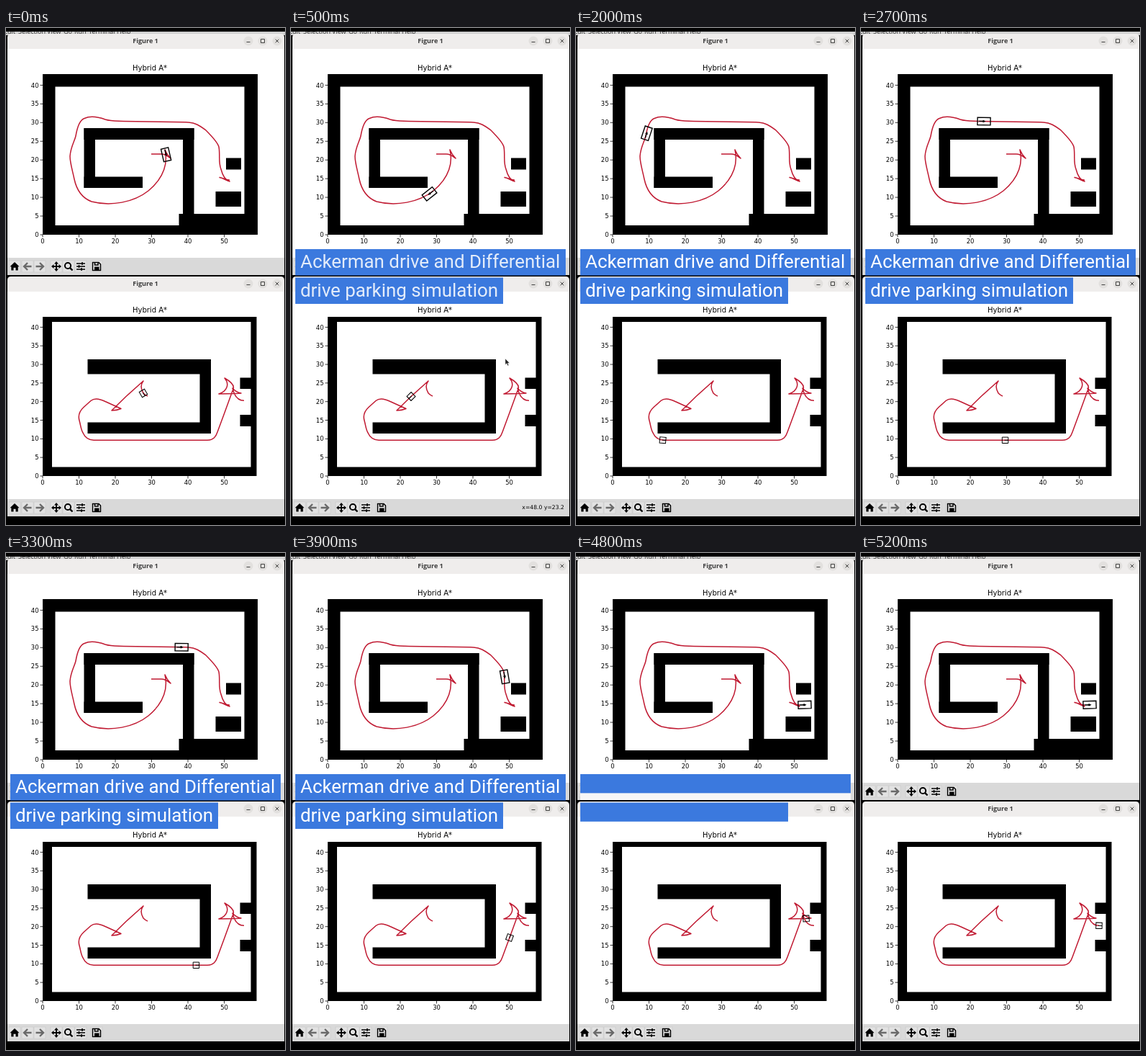
An HTML page for the animation above (5300 ms loop, 388 by 690 pixels).

```html
<!DOCTYPE html>
<html lang="en">
<head>
<meta charset="utf-8">
<title>Parking simulation</title>
<style>
  html, body { margin: 0; width: 100%; height: 100%; overflow: hidden; background: #000; }
  svg { display: block; width: 388px; height: 690px; }
  .menu { font: 9px "Open Sans", sans-serif; fill: #333; }
  .title { font: bold 9px "Open Sans", sans-serif; fill: #3c3c3c; text-anchor: middle; }
  .head { font: 10px "DejaVu Sans", sans-serif; text-anchor: middle; }
  .tick { font: 8.4px "DejaVu Sans", sans-serif; }
  .readout { font: 7.7px "DejaVu Sans", sans-serif; text-anchor: end; }
  .caption { font: 25.9px Roboto, sans-serif; fill: #fff; }
  .route { fill: none; stroke: #c01a32; stroke-width: 1.5; stroke-linejoin: round; }
  .car { fill: none; stroke: #000; stroke-width: 1.4; }
  .line { fill: none; stroke: #000; stroke-width: 1; }
</style>
</head>
<body>
<svg id="stage" viewBox="0 0 388 690" xmlns="http://www.w3.org/2000/svg"></svg>
<script>
const LOOP = 5300, STEP = 100;
const stage = document.getElementById('stage');

const rect = (x1, y1, x2, y2, fill = '#000', extra = '') =>
  `<rect x="${x1}" y="${y1}" width="${x2 - x1}" height="${y2 - y1}" fill="${fill}" ${extra}/>`;
const text = (cls, x, y, s, extra = '') =>
  `<text class="${cls}" x="${x}" y="${y}" ${extra}>${s}</text>`;
const boxes = list => list.map(b => rect(...b)).join('');

function titleBar(y) {
  const dots = [337, 357, 377].map(x => `<circle cx="${x}" cy="${y + 10}" r="6.5" fill="#e2e0de"/>`).join('');
  return `<path d="M2 ${y + 21}V${y + 5}q0 -5 5 -5H382q5 0 5 5V${y + 21}z" fill="#efedec"/>` +
    text('title', 194, y + 13.3, 'Figure 1') + dots +
    `<path class="line" stroke-opacity=".7" d="M334.5 ${y + 11.5}h5M354.5 ${y + 7.5}h5v5h-5z
      M374.7 ${y + 7.7}l4.6 4.6m0 -4.6l-4.6 4.6"/>`;
}

function toolbar(y) {
  const arrow = (x, flip) => `<path transform="translate(${x} 0) scale(${flip} 1)" d="M5.5 0H-5M0 -5L-5 0L0 5"
    fill="none" stroke="#6a6a6a" stroke-width="2.4"/>`;
  const frames = [12, 30, 47, 70, 87, 104, 126].map(x =>
    `<rect x="${x - 8}" y="-8" width="16" height="16" fill="#e2e2e2" stroke="#cacaca" stroke-width=".7"/>`).join('');
  return rect(2, y, 387, y + 24, '#d9d9d9') + `<g transform="translate(0 ${y + 12})">${frames}
    <path d="M12 -6L18.5 0.3H16.7V5.5H13.5V1.8H10.5V5.5H7.3V0.3H5.5z"/>${arrow(30, 1)}${arrow(47, -1)}
    <path d="M70 -5V5M65 0H75" stroke="#000" stroke-width="1.8"/>
    <path d="M70 -7l3 3.4h-6zM70 7l3 -3.4h-6zM63 0l3.4 -3v6zM77 0l-3.4 -3v6z"/>
    <circle cx="86" cy="-1" r="4.1" fill="none" stroke="#000" stroke-width="2"/>
    <path d="M88.8 1.8L92.5 5.5" stroke="#000" stroke-width="2.4"/>
    <path class="line" style="stroke-width:1.5" d="M98 -4H110M98 0H110M98 4H110M106 -6v4M101.5 -2v4M105 2v4"/>
    <path class="line" style="stroke-width:1.5" d="M120.5 -5.5H129L131.5 -3V5.5H120.5zM123.5 -5V-2H128V-5"/>
    <rect x="123" y="0.5" width="6.5" height="4.5"/></g>`;
}

function axes(bottom, unit) {
  let marks = '', labels = '';
  for (let v = 0; v <= 50; v += 10) {
    const x = 51 + v * 5.05;
    marks += `M${x} ${bottom}v3.5`;
    labels += text('tick', x, bottom + 12.2, v, 'text-anchor="middle"');
  }
  for (let v = 0; v <= 40; v += 5) {
    const y = bottom - v * unit;
    marks += `M51 ${y}h-3.5`;
    labels += text('tick', 45.5, y + 3.1, v, 'text-anchor="end"');
  }
  return `<path class="line" style="stroke-width:.8" d="${marks}"/>` + labels;
}

// Each leg: end time, gear (1 forward, -1 reverse), path continuing from the previous leg.
function makeRoute(start, lead, legs) {
  let from = start, t0 = 0, d = lead;
  const parts = legs.map(([t1, gear, curve]) => {
    const el = document.createElementNS(stage.namespaceURI, 'path');
    el.setAttribute('d', `M${from}${curve}`);
    const leg = { t0, t1, gear, el, len: el.getTotalLength() };
    from = curve.match(/[\d.]+,[\d.]+$/)[0];
    t0 = t1;
    d += curve;
    return leg;
  });
  return { d, parts };
}

function pose({ parts }, t) {
  const leg = parts.find(p => t < p.t1) || parts[parts.length - 1];
  const s = leg.len * Math.min(1, (t - leg.t0) / (leg.t1 - leg.t0));
  const at = q => leg.el.getPointAtLength(Math.max(0, Math.min(leg.len, q)));
  const p = at(s), a = at(s - .6), b = at(s + .6);
  const turn = Math.atan2((b.y - a.y) * leg.gear, (b.x - a.x) * leg.gear) * 180 / Math.PI;
  return `translate(${p.x} ${p.y}) rotate(${turn})`;
}

const upper = makeRoute('221,169', 'M202,175L216,175C222,175 225,178 229,181C226,178 223,174 221,169', [
  [500, 1, 'C225,186 221,207 198,226'],
  [1200, 1, 'C178,242 146,248 119,241'],
  [2700, 1, 'C106,236 98,224 95,210C92,196 89,187 89,178C90,165 95,158 97,150' +
    'C99,138 102,128 109,125.5C119,121 131,124.5 138,127C146,129.5 152,129 164,129.4'],
  [3900, 1, 'L250,130.8C264,131 270,136 278,142C286,150 294,158 296,165'],
  [4320, 1, 'C298,176 295,186 299,196C301,204 304,211 311,213'],
  [4440, -1, 'C306,212 302,208 297,207.5'],
  [4560, 1, 'C301,208 306,211.3 311,211'],
]);

const lower = makeRoute('191,507', 'M197,511Q194,510 191,507', [
  [190, -1, 'C188,502 186,496 191,490'],
  [500, 1, 'L167,511.5'],
  [770, 1, 'L147,531'],
  [930, -1, 'Q154,531 160,528.5'],
  [1200, 1, 'L138,518.5'],
  [2700, 1, 'C132,515.5 124,512.5 118,517.5L108,526.5C102,532 100,538 102,545' +
    'C104,552 104,557 107,562C110,569 115,572 122,572.3L200.5,572.3'],
  [3900, 1, 'L280,572.3C289,572 292,567 294,561L304,534'],
  [4210, 1, 'L316,501'],
  [4380, 1, 'C318,496 311,490 304,486'],
  [4600, -1, 'C311,494 308,504 296,508'],
  [4800, 1, 'L320,507.5'],
  [4860, 1, 'L327,507'],
  [4980, -1, 'Q320,506 315,500'],
  [5200, 1, 'C317,509 322,517.3 331,517.3'],
]);

stage.innerHTML =
  rect(0, 0, 388, 690) + rect(0, 0, 388, 10, '#d0d0d0') +
  [['Edit', -3], ['Selection', 17], ['View', 57], ['Go', 80], ['Run', 95], ['Terminal', 115], ['Help', 154]]
    .map(([name, x]) => text('menu', x, 8, name)).join('') +
  rect(0, 0, 388, 5) +
  titleBar(8) + rect(2, 29, 387, 320, '#fff') + toolbar(319) +
  titleBar(345) + rect(2, 366, 387, 655, '#fff') + toolbar(654) +
  text('head', 200, 58.5, 'Hybrid A*') + text('head', 200, 395, 'Hybrid A*') +
  boxes([
    [51, 64, 350, 287], [68.5, 81.5, 331.5, 274, '#fff'],
    [108.5, 139, 261.5, 155], [108.5, 139, 124, 222], [108.5, 206.5, 190, 222],
    [246, 139, 261.5, 287], [240.5, 258, 350, 287], [306, 180.5, 327, 196.5], [291.5, 227, 327, 248],
    [51, 401, 348.5, 622], [64, 408, 340.5, 609.5, '#fff'],
    [113.5, 460, 285, 480.5], [269.5, 460, 285, 563], [113.5, 547.5, 285, 563],
    [325.5, 485.5, 341, 501], [325.5, 537, 341, 553],
  ]) +
  axes(287, 5.19) + axes(622, 5.165) +
  `<path class="route" d="${upper.d}"/><path class="route" d="${lower.d}"/>
  <path class="car" id="ackerman" d="M-2 -5.2H16V5.2H-2zM0 0H8M5.5 -1.2L8 0L5.5 1.2"/>
  <path class="car" id="diff" style="stroke-width:1" d="M-4.2 -4.2H4.2V4.2H-4.2zM-1 0H4"/>` +
  text('readout', 380, 668, '', 'id="readout"') +
  `<path id="pointer" d="M0 0V8.5L2 6.7L3.5 10L5 9.3L3.6 6.2H6.2z" fill="#222" stroke="#fff" stroke-width=".5"/>` +
  rect(6, 307, 382, 343, '#f6f6f7', 'id="plate"') +
  rect(6, 307, 382, 343.5, '#3b79de', 'class="bar"') +
  rect(6, 346.5, 295, 383, '#3b79de', 'class="bar"') +
  '<g id="caption">' +
  text('caption', 13, 333, 'Ackerman drive and Differential') +
  text('caption', 13, 372.5, 'drive parking simulation') + '</g>';

const [ackerman, diff, readout, pointer, plate, caption] =
  ['ackerman', 'diff', 'readout', 'pointer', 'plate', 'caption'].map(id => document.getElementById(id));
const bars = document.querySelectorAll('.bar');
const ramp = (t, a, b) => Math.max(0, Math.min(1, (t - a) / (b - a)));
const mouse = t => [293.4 + (t - 400) * .045, 502 - (t - 400) * .43];
const show = (el, on) => el.setAttribute('visibility', on ? 'visible' : 'hidden');

function draw(t) {
  ackerman.setAttribute('transform', pose(upper, t));
  diff.setAttribute('transform', pose(lower, t));

  const grow = ramp(t, 0, 350) * (1 - ramp(t, 4700, 5060));
  bars.forEach(bar => bar.setAttribute('height', 36.5 * grow));
  show(plate, grow > 0);
  caption.setAttribute('opacity', ramp(t, 200, 550) * (1 - ramp(t, 4400, 4750)));

  show(pointer, t >= 300 && t <= 600);
  show(readout, t >= 400 && t <= 700);
  pointer.setAttribute('transform', `translate(${mouse(t)})`);
  const [mx, my] = mouse(t - STEP);
  readout.textContent = `x=${((mx - 51) / 5.05).toFixed(1)} y=${((622 - my) / 5.165).toFixed(1)}`;
}

const begin = performance.now();
function tick(now) {
  const t = Math.max(0, now - begin) % LOOP;
  draw(Math.floor(t / STEP) * STEP);
  requestAnimationFrame(tick);
}
draw(0);
requestAnimationFrame(tick);
</script>
</body>
</html>
```
